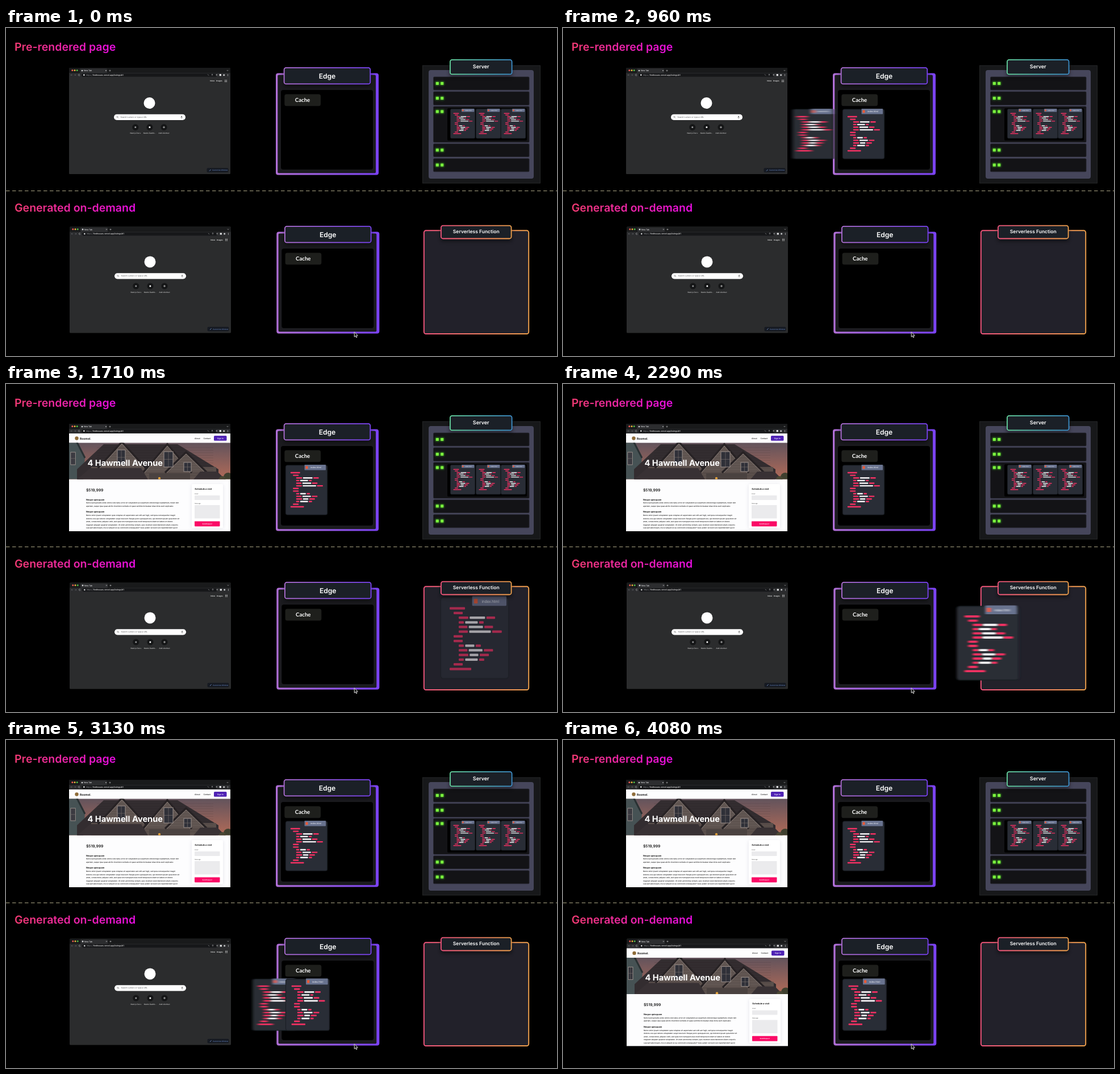
An HTML page that plays this animation: 970x577 px, repeating every 4120 ms.

```html
<!DOCTYPE html>
<html lang="en">
<head>
<meta charset="utf-8">
<title>Pre-rendered page and on-demand page</title>
<style>
  html, body { margin: 0; width: 100%; height: 100%; overflow: hidden; background: #000; }
  svg { display: block; }
  text { font-family: Inter, "Liberation Sans", sans-serif; text-rendering: geometricPrecision; white-space: pre; }
  .cache { font-family: Lato, "Open Sans", sans-serif; }
</style>
</head>
<body>
<svg id="stage" width="970" height="577" viewBox="0 0 970 577"></svg>
<script>
const LOOP = 4120;

const rect = (x, y, w, h, fill, r = 0, extra = '') =>
  `<rect x="${x}" y="${y}" width="${w}" height="${h}" rx="${r}" fill="${fill}" ${extra}/>`;
const dot = (x, y, r, fill) => `<circle cx="${x}" cy="${y}" r="${r}" fill="${fill}"/>`;
const poly = (points, fill) => `<polygon points="${points}" fill="${fill}"/>`;
const line = (d, stroke, width = 0.6) =>
  `<path d="${d}" fill="none" stroke="${stroke}" stroke-width="${width}"/>`;
const label = (x, y, size, str, fill = '#fff', weight = 400, anchor = 'start', cls = '') =>
  `<text x="${x}" y="${y}" font-size="${size}" fill="${fill}" font-weight="${weight}" text-anchor="${anchor}" class="${cls}">${str}</text>`;
const group = (x, y, body) => `<g transform="translate(${x} ${y})">${body}</g>`;
const gradient = (id, from, to) =>
  `<linearGradient id="${id}"><stop stop-color="${from}"/><stop offset="1" stop-color="${to}"/></linearGradient>`;
const blurFilter = id =>
  `<filter id="${id}" x="-40%" y="-10%" width="180%" height="120%"><feGaussianBlur stdDeviation="0 0"/></filter>`;

const defs = `<defs>
  ${gradient('title', '#f03a72', '#e60ce0')}
  ${gradient('violet', '#b06fd6', '#7a42f2')}
  ${gradient('teal', '#66d8a0', '#3c8fca')}
  ${gradient('warm', '#f2557c', '#efa04c')}
  <linearGradient id="sky" x2="0" y2="1"><stop stop-color="#62535c"/><stop offset="1" stop-color="#b26b58"/></linearGradient>
  <filter id="soft" x="-20%" y="-40%" width="140%" height="200%"><feGaussianBlur stdDeviation="3"/></filter>
  <filter id="glow" x="-60%" y="-60%" width="220%" height="220%"><feGaussianBlur stdDeviation="1.6"/></filter>
  ${['blurA', 'blurB', 'blurC', 'blurD'].map(blurFilter).join('')}
</defs>`;

// --- code card -------------------------------------------------------------
// each row: indent, then alternating red / white / red lengths
const rows = [
  [8.4, 16.8], [12.7, 10], [18.3, 10.5, 16.8, 9.5], [18.3, 5.6, 13.7, 5],
  [18.3, 9.5, 15.5, 9.5], [18.3, 10, 23.6, 10.5], [12.7, 10], [12.7, 10],
  [18.3, 5.6, 10, 5.6], [18.3, 9.5, 15, 10], [18.3, 10.5, 9.5, 10],
  [18.3, 5.6, 13.7, 5.6], [12.7, 10], [8.4, 23.6]
];

function card({ x = 0, y = 0, w = 73, h = 87, tab = -1 } = {}) {
  const code = rows.map(([left, ...parts], i) => parts.map((len, k) => {
    const bar = rect(left, 11.8 + i * 4.62, len, 2.4, k === 1 ? '#f6f3f5' : '#f43163', 0.7);
    left += len + 1.5;
    return bar;
  }).join('')).join('');
  return rect(x, y, w, h, '#292d36', 3, 'stroke="#1c2026" stroke-width="1.2"') + code +
    rect(33, tab, 37.5, 9.6, '#69738f', 0.8) + rect(35, tab + 2.6, 4, 4.6, '#ef5a35', 0.4) +
    label(43.5, tab + 6.4, 3.9, 'index.html', '#f2f3f7');
}
const lowCard = card({ x: -1.5, y: 2, w: 74.5, h: 80.7, tab: 0.9 });

// --- browser ---------------------------------------------------------------
function chrome() {
  return rect(111, 70, 284, 187, '#2b2c2d', 1.5) +
    rect(111, 70, 284, 9.5, '#191a1b', 1.5) + rect(130, 71.3, 48, 8.2, '#2c2d2f', 1.5) +
    dot(116.8, 74.5, 1.5, '#ee5c54') + dot(121, 74.5, 1.5, '#e9b53c') + dot(125.2, 74.5, 1.5, '#4dbb4a') +
    dot(134, 75, 1.3, '#d5d6d8') + label(137, 76.2, 3.4, 'New Tab', '#e4e5e7', 500) +
    line('M175 74l2 2m0-2l-2 2M181.5 75h3M183 73.5v3M388.7 74l1.3 1.4 1.3-1.4', '#c9cacc') +
    rect(111, 79.2, 284, 8, '#2b2c2e') + rect(133, 80, 238, 5.8, '#161719', 2.9) +
    line('M117 82.7h-3m1.2-1.2l-1.2 1.2 1.2 1.2M120 82.7h3m-1.2-1.2l1.2 1.2-1.2 1.2', '#77797c', 0.5) +
    line('M130 82a1.4 1.4 0 1 0 .1 1', '#d0d1d3', 0.5) + dot(137.3, 82.7, 1.4, '#d0d1d3') +
    label(141, 84, 3.4, '<tspan fill="#8b8d90">https://</tspan>findhouses.vercel.app/listings/#1', '#fff', 500) +
    line('M355 81.5l2 2M363 81v3m-1.2-1.8l1.2-1.2 1.2 1.2M369.2 82.4h3m-1.5-1.4v3', '#b9babd', 0.6) +
    rect(375.7, 81, 3.2, 3.2, '#e9eaeb', 0.4) + dot(383.7, 82.7, 1.5, '#c9cacc') +
    line('M390.5 81v3.6', '#b9babd', 0.7);
}

function newTab() {
  const grid = [0, 1, 2].flatMap(r => [0, 1, 2].map(c =>
    rect(385 + c * 1.5, 91.3 + r * 1.5, 0.9, 0.9, '#e2e2e2'))).join('');
  const links = ['Next.js Docs', 'Kestro Dashb...', 'Add shortcut'].map((name, i) => {
    const x = 227.8 + i * 25.1;
    const icon = i < 2 ? dot(x, 174.6, 1.5, i ? '#fff' : '#9a9b9d')
      : line(`M${x - 2} 174.6h4M${x} 172.6v4`, '#e5e5e5', 0.7);
    return dot(x, 174.6, 5.6, '#151617') + icon + label(x, 186.2, 3.1, name, '#f0f0f0', 400, 'middle');
  }).join('');
  return label(359, 94.3, 3.2, 'Inbox', '#fff', 500) + label(369.7, 94.3, 3.2, 'Images', '#fff', 500) + grid +
    dot(252.5, 132, 10, '#fff') + rect(190, 151.8, 126, 10.2, '#fff', 5.1) +
    `<circle cx="196" cy="156.4" r="1.2" fill="none" stroke="#555" stroke-width=".5"/>` +
    line('M197 157.4l1.2 1.2', '#555', 0.5) + rect(308.4, 154.6, 1.4, 2.8, '#555', 0.7) +
    line('M307.6 157a1.5 1.5 0 0 0 3 0M309.1 158.5v1', '#555', 0.4) +
    label(201.5, 158, 3.35, 'Search Lumero or type a URL', '#4b4c4e') + links +
    rect(353.5, 246.3, 38, 7.8, '#161a22', 2) + line('M358 251.6l2.6-2.6', '#7c9fe0', 0.8) +
    label(363, 251.4, 3, 'Customise Window', '#6f92d6');
}

function hero() {
  const gable = (x, y, w, h) =>
    poly(`${x},${y} ${x - w},${y + h} ${x + w},${y + h}`, '#625753') +
    line(`M${x - w - 3} ${y + h + 2}L${x} ${y}L${x + w + 3} ${y + h + 2}`, '#282325', 3.5) +
    line(`M${x - w} ${y + h + 2}L${x} ${y + 3}L${x + w} ${y + h + 2}`, '#8f847e', 0.9);
  const pane = (x, y, w, h) => rect(x, y, w, h, '#2f3038', 0, 'stroke="#9b908b" stroke-width="1"') +
    line(`M${x + w / 2} ${y}v${h}M${x} ${y + h / 2}h${w}`, '#7d7471', 0.6);
  const siding = Array.from({ length: 12 }, (_, i) => `M160 ${112 + i * 4.5}h205`).join('');
  return `<svg x="111" y="103.5" width="284" height="64" viewBox="111 103.5 284 64">` +
    rect(111, 103, 284, 65, 'url(#sky)') +
    poly('111,103 127,103 139,128 136,168 111,168', '#465254') +
    line('M124 101L139 130', '#2a3133', 3) + pane(114, 120, 8, 22) +
    poly('125,150 172,106 302,106 374,150 374,168 125,168', '#332d30') +
    rect(150, 146, 220, 22, '#5a4f4b') +
    gable(204, 102, 39, 44) + gable(284, 106, 40, 48) + gable(317, 120, 34, 34) +
    line(siding, 'rgba(30,22,22,.2)', 0.6) +
    pane(196, 116, 14, 26) + pane(278, 119, 16, 27) + pane(313, 138, 13, 16) +
    poly('125,168 148,148 238,148 250,168', '#383134') + poly('330,168 342,154 372,154 386,168', '#383134') +
    rect(252, 157, 72, 11, '#4a4240') + dot(270, 166, 2.2, '#e6a43b') +
    dot(391, 164, 8, '#3f402f') + dot(381, 168, 6, '#494734') + '</svg>';
}

function page() {
  const first = [
    'Sed ut perspiciatis unde omnis iste natus error sit voluptatem accusantium doloremque laudantium, totam rem',
    'aperiam, eaque ipsa quae ab illo inventore veritatis et quasi architecto beatae vitae dicta sunt explicabo.'
  ];
  const second = [
    'Nemo enim ipsam voluptatem quia voluptas sit aspernatur aut odit aut fugit, sed quia consequuntur magni',
    'dolores eos qui ratione voluptatem sequi nesciunt. Neque porro quisquam est, qui dolorem ipsum quia dolor sit',
    'amet, consectetur, adipisci velit, sed quia non numquam eius modi tempora incidunt ut labore et dolore',
    'magnam aliquam quaerat voluptatem. Ut enim ad minima veniam, quis nostrum exercitationem ullam corporis',
    'suscipit laboriosam, nisi ut aliquid ex ea commodi consequatur? Quis autem vel eum iure reprehenderit qui in'
  ];
  const para = (y, lines) => lines.map((s, i) => label(141, y + i * 5.5, 3.12, s, '#111', 500)).join('');
  return rect(111, 87, 284, 172, '#fdfdfe') +
    dot(124.5, 95.5, 3.2, '#8f6d3a') + label(130, 97.6, 5, 'Roomel.', '#141414', 700) +
    label(332, 96.8, 3.4, 'About', '#1c1c1c', 500) + label(347.5, 96.8, 3.4, 'Contact', '#1c1c1c', 500) +
    rect(366, 91, 22.5, 8.8, '#4f22b4', 1.6) + label(377.2, 96.8, 3.4, 'Sign In', '#fff', 500, 'middle') +
    hero() + label(143.5, 144, 14.6, '4 Hawmell Avenue', '#fff', 700) +
    label(141, 188.7, 6.7, '$519,999', '#161616', 600) +
    label(141, 204.8, 3.9, 'Neque quisquam', '#161616', 700) + para(210.2, first) +
    label(141, 226.2, 3.9, 'Neque quisquam', '#161616', 700) + para(232.3, second) +
    rect(327, 177, 55, 77, '#cfcfda', 2, 'filter="url(#soft)" opacity=".6"') + rect(327, 176, 55, 77.5, '#fff', 1.5) +
    label(332.3, 186, 3.9, 'Schedule a visit', '#161616', 700) +
    label(332.3, 193.8, 2.4, 'Email', '#444') + rect(332, 196, 44.5, 8, '#ebebed', 0.6) +
    label(332.3, 211, 2.4, 'Message', '#444') + rect(332, 213, 44.5, 23.5, '#ebebed', 0.6) +
    rect(332, 241.4, 44.5, 9, '#fa0b66', 0.8) + label(354.2, 246.8, 2.6, 'Send Request', '#fff', 600, 'middle');
}

const browser = (x, y, id) => group(x, y, chrome() + newTab() + `<g id="${id}">${page()}</g>`);

// --- panels ----------------------------------------------------------------
const header = (x, y, w, h, paint, size, base, str) =>
  rect(x, y + 4, w, h, '#000', 4, 'filter="url(#soft)" opacity=".45"') +
  rect(x + 0.9, y + 0.9, w - 1.8, h - 1.8, '#1b2027', 3.5, `stroke="url(#${paint})" stroke-width="1.8"`) +
  label(x + w / 2, base, size, str, '#fff', 600, 'middle');

const edge = (x, y) => group(x, y,
  rect(475, 79.5, 181, 179, 'url(#violet)', 4) + rect(478.3, 82.5, 172.7, 172.7, '#1b1b1f', 2) +
  rect(484, 109, 162, 140, '#000', 4) +
  header(488.7, 69, 153.5, 30.3, 'violet', 12.1, 88.7, 'Edge') +
  rect(490.3, 116.5, 63.7, 20.7, '#1e1f1c', 3.5) +
  label(522, 130, 9.6, 'Cache', '#fff', 700, 'middle', 'cache'));

const serverCards = [782.5, 827.5, 871.5];
function server() {
  const slots = [[86, 23], [112, 23.5], [138, 63], [203.8, 22.7], [229.8, 23]].map(([y, h]) =>
    rect(752.5, y, 168.5, h, '#131316', 1.5, 'stroke="#25252d" stroke-width=".8"')).join('');
  const led = (x, y) => rect(x - 1, y - 1, 7, 7, '#3fae22', 1, 'filter="url(#glow)" opacity=".7"') +
    rect(x, y, 5, 5, '#7cf53e', 0.5);
  const leds = [95, 121, 144.5, 212.3, 238.4].map(y => led(756.8, y) + led(765.2, y)).join('');
  const cards = serverCards.map(x =>
    `<g transform="translate(${x} 142.5) scale(.592)">${card()}</g>`).join('');
  return rect(733.5, 66, 207, 207, '#17181a', 0, 'stroke="#2c2d2f" stroke-width=".8"') +
    rect(744, 74, 185, 191, '#46465b', 4) + slots + leds + rect(777, 141, 140, 57, '#000', 2) + cards +
    header(781, 55, 110.5, 27.3, 'teal', 9, 71.4, 'Server');
}

const lambda =
  rect(735.8, 356.3, 184.4, 181.7, '#22212a', 3.5, 'stroke="url(#warm)" stroke-width="1.9"');

const mover = (id, body) => `<g id="${id}"><g>${body}</g></g>`;

document.getElementById('stage').innerHTML = defs + rect(0, 0, 970, 577, '#000') +
  label(15, 40, 19.5, 'Pre-rendered page', 'url(#title)', 600) +
  label(15, 323, 19.5, 'Generated on-demand', 'url(#title)', 600) +
  `<path d="M0 286.5H970" stroke="#aca685" stroke-width="1.1" stroke-dasharray="6.5 4.5"/>` +
  browser(0, 0, 'pageA') + browser(1, 279.4, 'pageB') + edge(0, 0) + edge(1.3, 279) +
  server() + lambda + mover('cardB', card()) + mover('cardA', card()) +
  mover('cardD', lowCard) + mover('cardC', lowCard) +
  header(765, 346.8, 125.5, 24.6, 'warm', 8.5, 361.4, 'Serverless Function') +
  `<path d="M613.2 534.8v8.6l2-1.8 1.3 3 1.5-.7-1.3-2.9h2.6z" fill="#111" stroke="#eee" stroke-width=".9"/>`;

// --- motion ----------------------------------------------------------------
// poses: x, y, x scale, y scale
const inServer = [782.5, 142.5, 0.592, 0.592];
const inEdgeA = [492.5, 143, 1, 1];
const inEdgeB = [494, 418.5, 1.03, 1.117];
const tracks = [
  { id: 'A', from: inServer, to: inEdgeA, start: 77, dur: 600, show: 77 },
  { id: 'B', from: inEdgeA, to: [216, 143, 1, 1], start: 735, dur: 600, show: 735, leave: true },
  { id: 'C', from: [767.5, 377.3, 1.61, 1.775], to: inEdgeB, start: 1989, dur: 900, show: 1500, fade: 340 },
  { id: 'D', from: inEdgeB, to: [217, 418.5, 1.03, 1.117], start: 2954, dur: 600, show: 2954, leave: true }
];
const pages = [['pageA', 1270], ['pageB', 3490]];
const DROP = 15; // fading cards settle downwards by this much

const $ = id => document.getElementById(id);
const unit = v => Math.max(0, Math.min(1, v));
const ease = u => u * u * (3 - 2 * u);

function draw(t) {
  for (const { id, from, to, start, dur, show, fade, leave } of tracks) {
    const u = unit((t - start) / dur);
    const [x, y, sx, sy] = from.map((v, i) => v + (to[i] - v) * ease(u));
    const speed = Math.abs(to[0] - from[0]) * 6 * u * (1 - u) / dur;
    const sigma = speed * 5;
    const shown = t < show ? 0 : fade ? unit((t - show) / fade) : 1;
    const alpha = leave ? shown * unit((1 - u) * 6) : shown;
    const outer = $('card' + id);
    outer.setAttribute('opacity', alpha);
    outer.setAttribute('display', alpha ? 'inline' : 'none');
    outer.firstChild.setAttribute('transform',
      `translate(${x} ${y - DROP * (1 - shown)}) scale(${sx} ${sy})`);
    $('blur' + id).firstChild.setAttribute('stdDeviation', `${sigma} 0`);
    outer.setAttribute('filter', sigma > 0.05 ? `url(#blur${id})` : 'none');
  }
  for (const [id, at] of pages) $(id).setAttribute('opacity', unit((t - at) / 120));
}

const begin = performance.now();
function tick() {
  draw((performance.now() - begin) % LOOP);
  requestAnimationFrame(tick);
}
tick();
</script>
</body>
</html>
```
